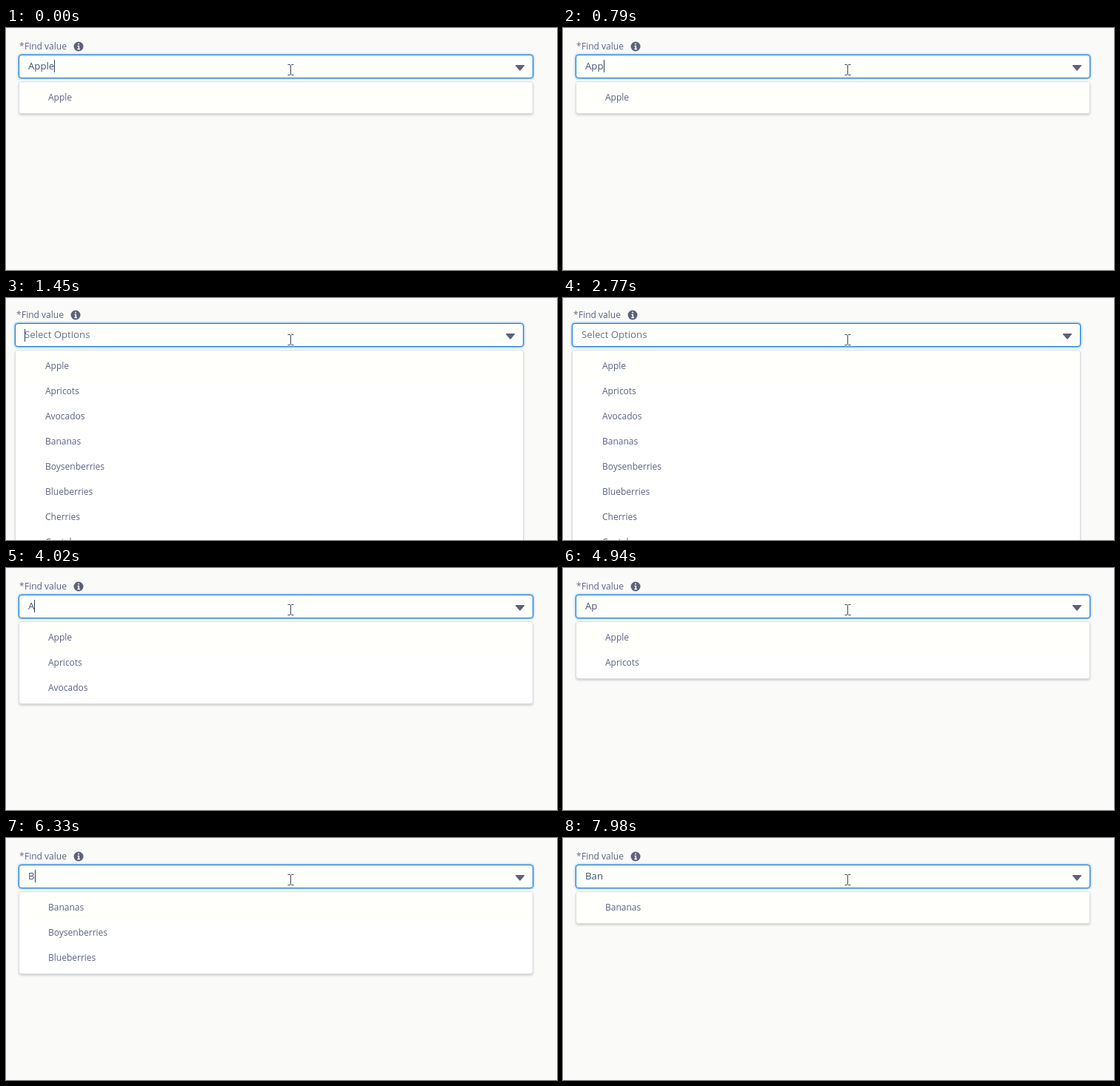
Write an HTML page that moves like this. It is 744 px wide and 327 px high and loops after 8 s.

```html
<!DOCTYPE html>
<html lang="en">
<head>
<meta charset="utf-8">
<title>Find value</title>
<style>
  html, body { margin: 0; width: 100%; height: 100%; overflow: hidden; background: #fafaf9; }
  #stage { position: relative; width: 744px; height: 327px; overflow: hidden;
    font: 12px/17px "Open Sans", sans-serif; color: #5a6480; }
  #stage * { box-sizing: border-box; }
  #stage > * { position: absolute; white-space: pre; }

  #star { left: 18px; top: 16px; color: #75697a; }
  #label { left: 25px; top: 16px; }
  #field { left: 17px; top: 36px; width: 695px; height: 32px; padding-left: 12px;
    border: 1px solid #1580dc; border-radius: 4px; background: #fffffc;
    box-shadow: 0 0 3px #0070d2; font-size: 13.2px; line-height: 28px; color: #42526f; }
  #field .hint { color: #69728a; }
  #caret { position: absolute; top: 6px; width: 1px; height: 17px; background: #2c3f60; }
  #list { left: 17px; top: 72px; width: 695px; padding: 3px 0 5px; border: 1px solid #d9dce0;
    border-radius: 4px; background: #fff; box-shadow: 0 2px 3px rgba(0, 0, 0, .16); }
  #list div { height: 34px; padding-left: 39px; line-height: 35px; }
  #list::before { content: ""; position: absolute; inset: 0 0 auto; height: 42px;
    border-radius: 3px; background: #fffffb; z-index: -1; }
  #list { z-index: 0; }
  svg { left: 0; top: 0; z-index: 1; }

  /* The full list brings a page scrollbar, which narrows the layout. */
  .narrow #star, .narrow #label, .narrow #info { transform: translate(-4px, -2px); }
  .narrow #field { left: 12px; top: 34px; width: 687px; }
  .narrow #list { left: 12px; top: 70px; width: 687px; }
  .narrow #list div { padding-left: 40px; }
  .narrow #caret { top: 7px; }
  .narrow #arrow { transform: translate(-13px, -2px); }
</style>
</head>
<body>
<div id="stage">
  <span id="star">*</span>
  <span id="label">Find value</span>
  <div id="field"></div>
  <div id="list"></div>
  <svg width="744" height="327">
    <g id="info">
      <circle cx="98" cy="25" r="6.5" fill="#5d6278"/>
      <path d="M97 21.5h2M96.5 24.5h1.8v3.8M96.3 28.4h3.6" fill="none" stroke="#fff" stroke-width="1.5"/>
    </g>
    <path id="arrow" d="M688.5 50h11q1 .3 .3 1.3l-5 6q-.8 .8-1.6 0l-5-6q-.7-1 .3-1.3z" fill="#5c617a"/>
    <path d="M380.5 49.5h3l1 1 1-1h3M384.5 50v13M380.5 63.5h3l1-1 1 1h3" fill="none" stroke="#3d4658"/>
  </svg>
</div>
<script>
const LOOP = 8000;
const fruits = ["Apple", "Apricots", "Avocados", "Bananas", "Boysenberries", "Blueberries", "Cherries", "Cantaloupe"];

// Start time and field content; a trailing bar means the caret is visible.
const steps = [
  [0, "Apple|"], [70, "Apple"], [530, "Appl|"], [790, "App|"], [990, "Ap"], [1120, "A"],
  [1320, ""], [1450, "|"], [1850, ""], [2310, "|"], [2770, ""], [3230, "|"], [3690, ""],
  [4020, "A|"], [4480, "Ap|"], [4940, "Ap"], [5270, "A"], [5400, "A|"],
  [5600, "|"], [5800, ""], [6260, "|"],
  [6330, "B|"], [6590, "Ba|"], [7050, "Ba"], [7450, "Ba|"], [7580, "Ban|"], [7980, "Ban"]
];

const [stage, field, list] = ["stage", "field", "list"].map(id => document.getElementById(id));
let shown = null;

function show(content) {
  const typed = content.replace("|", "");
  const caret = content.endsWith("|") ? '<i id="caret"></i>' : "";
  const hint = typed ? "" : '<span class="hint">Select Options</span>';
  stage.className = typed ? "" : "narrow";
  field.innerHTML = typed + caret + hint;
  list.innerHTML = fruits.filter(name => name.startsWith(typed)).map(name => `<div>${name}</div>`).join("");
}

const start = performance.now();
function tick() {
  const time = (performance.now() - start) % LOOP;
  const content = steps.filter(([from]) => from <= time).pop()[1];
  if (content !== shown) show(shown = content);
  requestAnimationFrame(tick);
}
tick();
</script>
</body>
</html>
```
